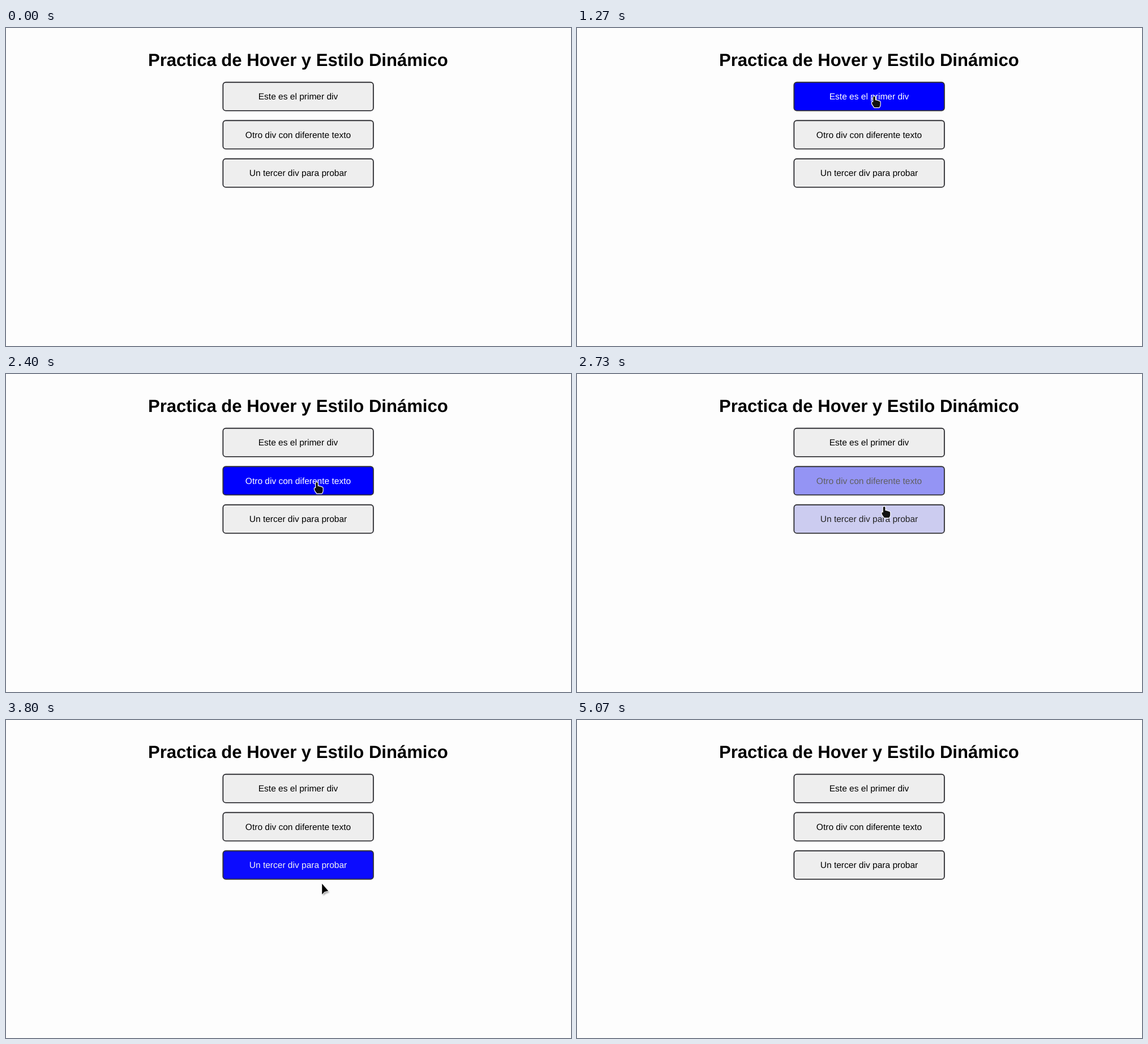
Recreate the animation shown at these times as an HTML page. Size 998 by 561 pixels, loop 5.2 s.

```html
<!DOCTYPE html>
<html lang="es">
<head>
<meta charset="utf-8">
<title>Hover</title>
<style>
  html, body { margin: 0; width: 100%; height: 100%; overflow: hidden; background: #fdfdfd; }
  svg { display: block; width: 998px; height: 561px; }
  text {
    font-family: "Liberation Sans", Arial, sans-serif; font-size: 15.53px;
    text-anchor: middle; text-rendering: geometricPrecision;
  }
  .title { font-size: 31.06px; font-weight: bold; }
  .box { stroke: #333337; stroke-width: 1.9; }
</style>
</head>
<body>
<svg viewBox="0 0 998 561">
  <defs>
    <filter id="soft" x="-50%" y="-50%" width="200%" height="200%">
      <feGaussianBlur stdDeviation="1.1"/>
    </filter>
  </defs>
  <text class="title" x="515.8" y="67">Practica de Hover y Estilo Dinámico</text>
  <g id="boxes"></g>
  <g id="arrow">
    <path d="M0 0V19L5 15L11 13Z" transform="translate(2 2.5)" opacity=".3" filter="url(#soft)"/>
    <path d="M0 0V19L4.5 14.4L11 12.8Z" stroke="#fff" stroke-width="1.4" stroke-linejoin="round" paint-order="stroke"/>
  </g>
  <g id="hand">
    <path d="M-1.8 1.4Q0 -1.2 1.8 1.4V7.2Q3.4 6.2 4.8 7.8Q6.4 7 7.6 8.6Q10.6 8.2 10.6 11V15Q10.4 17.6 8.8 19.6H0.2Q-1 17.6 -2.8 15.4Q-4.4 13 -4 10.6Q-3.2 9.4 -1.8 10.6Z"
      fill="#111" stroke="#fff" stroke-width="2.4" stroke-linejoin="round" paint-order="stroke"/>
  </g>
</svg>
<script>
const LOOP = 5200, TICK = 200 / 3, FADE = 300;
const SHOW = 460, HIDE = 4130;

const items = [
  { label: "Este es el primer div", enter: 847, leave: 1583 },
  { label: "Otro div con diferente texto", enter: 1648, leave: 2625 },
  { label: "Un tercer div para probar", enter: 2695, leave: 3780 }
];

// key points of the pointer: time, x, y
const path = [
  [460, 991, 443], [800, 635, 151], [867, 550, 146], [1400, 526, 120],
  [1733, 553, 173], [2400, 549, 191], [2695, 543, 231], [3067, 541, 247],
  [3733, 550, 262], [4067, 618, 488]
];

const NS = "http://www.w3.org/2000/svg";
const el = id => document.getElementById(id);

function add(tag, attrs) {
  const node = document.createElementNS(NS, tag);
  for (const k in attrs) node.setAttribute(k, attrs[k]);
  return el("boxes").appendChild(node);
}

items.forEach((item, i) => {
  const y = 95.8 + i * 67.5;
  item.rect = add("rect", { class: "box", x: 383.3, y, width: 265.6, height: 50.1, rx: 5 });
  item.text = add("text", { x: 516, y: y + 30.2 });
  item.text.textContent = item.label;
});

// CSS "ease": cubic-bezier(.25, .1, .25, 1)
function ease(p) {
  if (p <= 0) return 0;
  if (p >= 1) return 1;
  const curve = (a, b, u) => 3 * a * u * (1 - u) ** 2 + 3 * b * u * u * (1 - u) + u ** 3;
  let lo = 0, hi = 1;
  for (let i = 0; i < 24; i++) {
    const mid = (lo + hi) / 2;
    if (curve(0.25, 0.25, mid) < p) lo = mid; else hi = mid;
  }
  return curve(0.1, 1, lo);
}

function slope(i, axis) {
  const a = path[Math.max(i - 1, 0)], b = path[Math.min(i + 1, path.length - 1)];
  return (b[axis] - a[axis]) / (b[0] - a[0]);
}

// smooth curve through the key points
function pointer(t, axis) {
  let i = 0;
  while (i < path.length - 2 && t > path[i + 1][0]) i++;
  const a = path[i], b = path[i + 1], span = b[0] - a[0];
  const u = (t - a[0]) / span, v = 1 - u;
  return a[axis] * (1 + 2 * u) * v * v + b[axis] * (3 - 2 * u) * u * u
    + span * u * v * (slope(i, axis) * v - slope(i + 1, axis) * u);
}

function draw(t) {
  for (const { rect, text, enter, leave } of items) {
    const h = ease((t - enter) / FADE) - ease((t - leave) / FADE);
    const c = Math.round(238 * (1 - h)), w = Math.round(255 * h);
    rect.style.fill = `rgb(${c},${c},${Math.round(238 + 17 * h)})`;
    text.style.fill = `rgb(${w},${w},${w})`;
  }
  const over = items.some(b => t >= b.enter && t < b.leave);
  const shown = t >= SHOW && t < HIDE;
  el("hand").style.display = shown && over ? "" : "none";
  el("arrow").style.display = shown && !over ? "" : "none";
  const at = `translate(${pointer(t, 1).toFixed(2)} ${pointer(t, 2).toFixed(2)})`;
  el(over ? "hand" : "arrow").setAttribute("transform", at);
}

const start = performance.now();
function frame() {
  const t = (performance.now() - start) % LOOP;
  draw(Math.floor((t + 4) / TICK) * TICK); // 15 steps per second
  requestAnimationFrame(frame);
}
draw(0);
requestAnimationFrame(frame);
</script>
</body>
</html>
```
